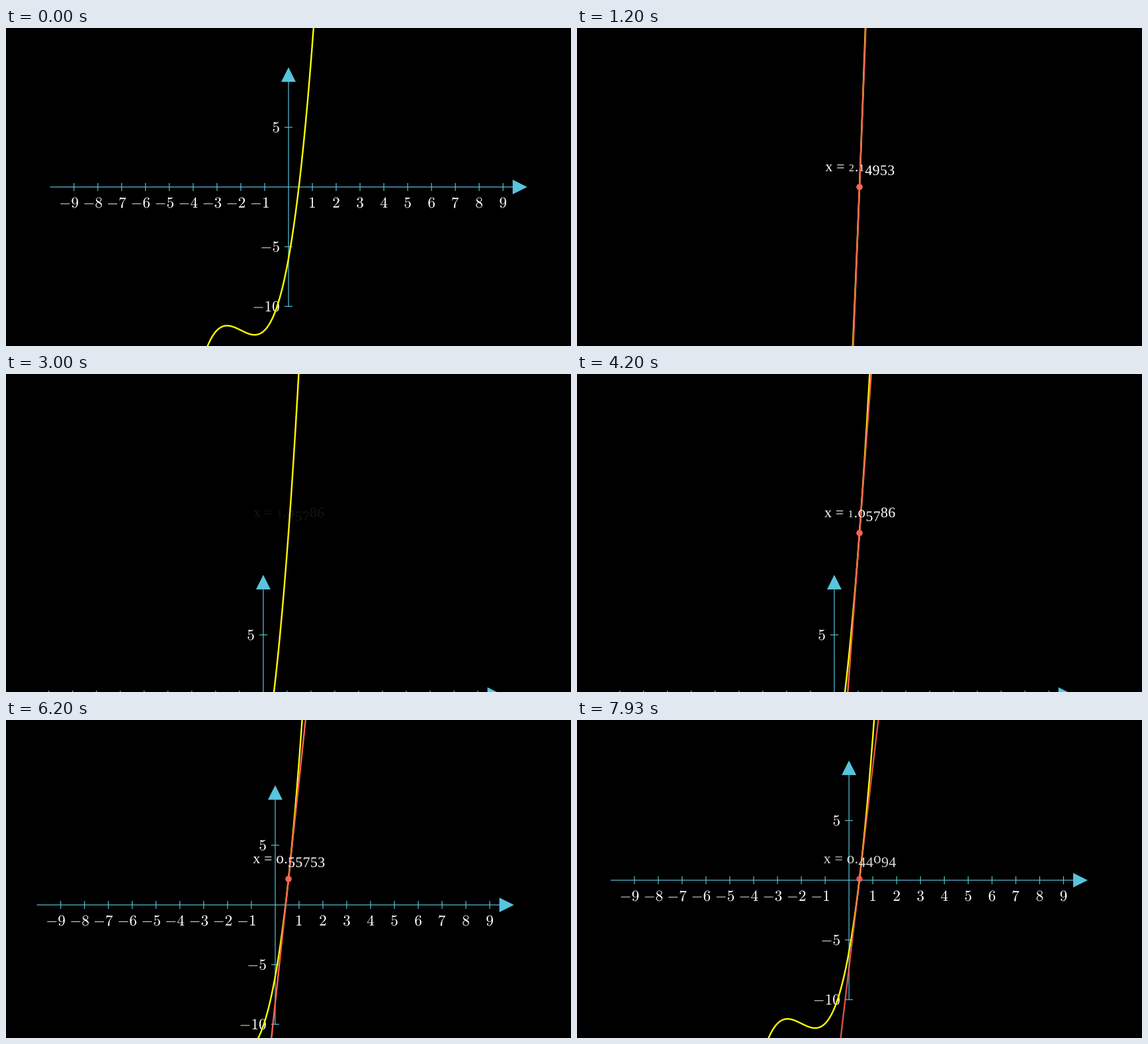
Animation of 854 by 480 pixels, one loop 8 s. Source, as a matplotlib script:

```python
import matplotlib.pyplot as plt
import numpy as np
from matplotlib.animation import FuncAnimation
from matplotlib.patches import Circle, PathPatch, Polygon
from matplotlib.path import Path
from matplotlib.textpath import TextPath
from matplotlib.transforms import Affine2D

plt.rcParams["mathtext.fontset"] = "cm"

W, H, DPI = 854, 480, 64
PX = 72 / DPI                      # points per pixel
UX, UY = 36.03, 18.02              # pixels per axis unit
FRAMES, LOOP_MS = 120, 8000
BLUE, YELLOW, RED = "#58C4DD", "#FFFF00", "#FC6255"

# Timing in ticks of 1/30 s
STEP, MOVE, SHOW, HIDE, FADE = 70, 15, 16, 55, 15


def f(x):
    return x**3 + 6 * x**2 + 11 * x - 6


def df(x):
    return 3 * x**2 + 12 * x + 11


def newton(x, n):
    roots = []
    for _ in range(n):
        x -= f(x) / df(x)
        roots.append(x)
    return roots


def smooth(t):
    t = min(max(t, 0), 1)
    sig = lambda v: 1 / (1 + np.exp(-v))
    edge = sig(-5)
    return min(max((sig(10 * (t - 0.5)) - edge) / (1 - 2 * edge), 0), 1)


def join(paths):
    return Path(np.concatenate([p.vertices for p in paths]),
                np.concatenate([p.codes for p in paths]))


def moved(path, dx, dy):
    return path.transformed(Affine2D().translate(dx, dy))


# ---- axis numbers ----
def math(text):
    return TextPath((0, 0), f"${text}$", size=23.2)


def x_number(n):
    path = math(n)
    box = path.get_extents()
    shift = math("-").get_extents().width / 2 if n < 0 else 0
    return moved(path, n * UX - shift - (box.x0 + box.x1) / 2, -15.6 - box.y1)


def y_number(n):
    path = math(n)
    box = path.get_extents()
    return moved(path, -14.2 - box.x1, n * UY - (box.y0 + box.y1) / 2)


# ---- readout with old-style figures ----
EM = 22
SERIF = {"family": "Liberation Serif"}


def figure_style(ch):
    """Glyph, scale and drop below the baseline."""
    if ch == "0":
        return "o", 1.06, 0
    if ch in "12":
        return ch, 0.7, 0
    if ch in "34579":
        return ch, 1, 0.26 * EM
    return ch, 1, 0


def advance(ch, scale):
    """Width of a glyph with its side bearings."""
    ink = lambda s: TextPath((0, 0), s, size=EM * scale, prop=SERIF).get_extents()
    return ink(ch + "x").x1 - ink("x").x1


def readout(value):
    pen, parts = 0, []
    for ch in f"x = {value:.5f}":
        if ch == " ":
            pen += EM / 4
            continue
        glyph, scale, drop = figure_style(ch)
        width = advance(glyph, scale)
        cell = max(width, 9.3) if ch.isdigit() else width
        path = TextPath((0, 0), glyph, size=EM * scale, prop=SERIF)
        parts.append(moved(path, pen + (cell - width) / 2, -drop))
        pen += cell + 0.3
    path = join(parts)
    box = path.get_extents()
    return moved(path, 0.4 - (box.x0 + box.x1) / 2, 23.8)


# ---- stage ----
fig = plt.figure(figsize=(W / DPI, H / DPI), dpi=DPI, facecolor="black")
ax = fig.add_axes([0, 0, 1, 1])
ax.axis("off")


def stroke(xs, ys, color, width, z):
    line, = ax.plot(xs, ys, color=color, lw=width * PX, zorder=z,
                    solid_capstyle="butt", snap=False)
    return line


def fill(patch, color, z):
    patch.set(facecolor=color, edgecolor="none", linewidth=0, zorder=z)
    return ax.add_patch(patch)


stroke([-10 * UX, 10 * UX - 15], [0, 0], BLUE, 1.2, 1)
stroke([0, 0], [-10 * UY, 10 * UY - 15], BLUE, 1.2, 1)
x_ticks = [n for n in range(-9, 10) if n]
y_ticks = [-10, -5, 5]
for n in x_ticks:
    stroke([n * UX] * 2, [-6, 6], BLUE, 1.2, 1)
for n in y_ticks:
    stroke([-6, 6], [n * UY] * 2, BLUE, 1.2, 1)

tip = np.array([[0.5, 0], [-21.5, 11], [-21.5, -11]])
fill(Polygon(tip + [10 * UX, 0]), BLUE, 2)
fill(Polygon(tip[:, ::-1] + [0, 10 * UY]), BLUE, 2)

numbers = [x_number(n) for n in x_ticks] + [y_number(n) for n in y_ticks]
fill(PathPatch(join(numbers)), "white", 2)

xs = np.linspace(-5, 4, 1200)
stroke(xs * UX, f(xs) * UY, YELLOW, 2.4, 3)

tangent = stroke([], [], RED, 2.4, 4)
dot = fill(Circle((0, 0), 4.8), RED, 5)

guesses = newton(4.0, 4)
stops = [np.zeros(2)] + [np.array([x * UX, f(x) * UY]) for x in guesses]
labels = [readout(x) for x in guesses]
text = fill(PathPatch(labels[0]), "white", 6)


def draw(k):
    step, tick = divmod(2 * k, STEP)
    goal = stops[step + 1]
    cx, cy = stops[step] + (goal - stops[step]) * smooth(tick / MOVE)
    ax.set_xlim(cx - W / 2, cx + W / 2)
    ax.set_ylim(cy - H / 2, cy + H / 2)

    alpha = smooth((tick - SHOW) / FADE) * (1 - smooth((tick - HIDE) / FADE))
    slope = df(guesses[step]) * UY / UX
    run = np.array([-1, 1]) * 300 / slope
    tangent.set_data(goal[0] + run, goal[1] + run * slope)
    dot.center = goal
    text.set_path(moved(labels[step], *goal))
    for item in (tangent, dot, text):
        item.set_alpha(alpha)
        item.set_visible(alpha > 0)
    return tangent, dot, text


anim = FuncAnimation(fig, draw, frames=FRAMES, interval=LOOP_MS / FRAMES,
                     init_func=lambda: draw(0), repeat=True, repeat_delay=0,
                     blit=False)
plt.show()
```
